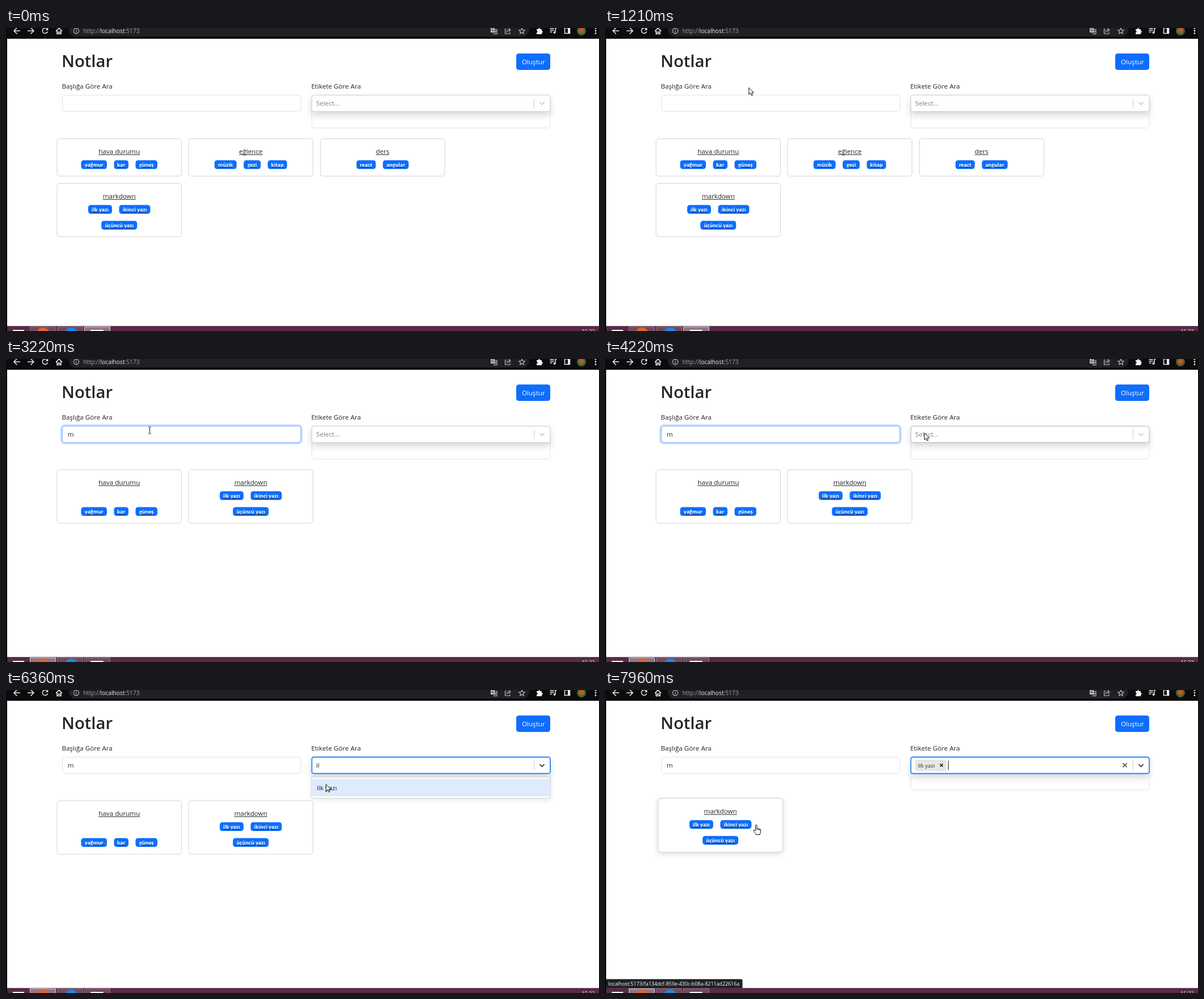
Animation of 1046 by 535 pixels, one loop 8 s. Source, as an HTML page:

```html
<!DOCTYPE html>
<html lang="tr">
<head>
<meta charset="utf-8">
<title>Notlar</title>
<style>
  html, body { margin: 0; width: 100%; height: 100%; overflow: hidden; background: #fff; }
  svg { display: block; }
  #stage { position: absolute; left: 0; top: 0; }
  text { font: 11.65px "Open Sans", "Noto Sans", sans-serif; fill: #212529; white-space: pre; }
  .mid { text-anchor: middle; }
  .h1 { font-size: 29.3px; font-weight: 600; }
  .badge { font-size: 8.65px; font-weight: 700; fill: #fff; }
  .tag { font-size: 9.8px; fill: #333; }
  .url { font-size: 10.25px; fill: #9aa0a6; }
  .status { font-size: 8.9px; fill: #fff; }
  .clock { font-size: 9px; fill: #fff; }
  .hint { fill: #808080; }
  .line { fill: none; stroke: #e8eaed; stroke-width: 1.5; }
  .thin { fill: none; stroke: #c4c7cb; stroke-width: 1.1; }
</style>
</head>
<body>
<svg id="stage" width="1046" height="535" viewBox="0 0 1046 535"></svg>
<script>
const LOOP = 8000;
const BLUE = '#0d6efd', FOCUS = '#2684ff', INK = '#212529';
const stage = document.getElementById('stage');

function el(tag, attrs, parent = stage) {
  const node = document.createElementNS('http://www.w3.org/2000/svg', tag);
  for (const k in attrs) node.setAttribute(k, attrs[k]);
  return parent.appendChild(node);
}
const group = (parent) => el('g', {}, parent);
const box = (x, y, width, height, fill, parent, more) =>
  el('rect', { x, y, width, height, fill, ...more }, parent);
const path = (d, attrs, parent) => el('path', { d, ...attrs }, parent);
function text(str, x, y, cls = '', parent) {
  const node = el('text', { x, y, class: cls }, parent);
  node.textContent = str;
  return node;
}
const show = (node, on) => { node.style.display = on ? '' : 'none'; };
const clamp = (v) => Math.max(0, Math.min(1, v));
const smooth = (v) => { v = clamp(v); return v * v * (3 - 2 * v); };
const between = (t, a, b) => t >= a && t < b;

// Page
box(0, 0, 1046, 535, '#fff');
text('Notlar', 98, 69, 'h1');
box(900, 45, 60, 29, BLUE, stage, { rx: 4.6 });
text('Oluştur', 930.3, 64, 'mid').style.fill = '#fff';
text('Başlığa Göre Ara', 98.5, 107);
text('Etikete Göre Ara', 538.5, 107);

// Note cards
const WIDTHS = {
  'yağmur': 45.5, 'kar': 25.5, 'güneş': 38.5, 'müzik': 39, 'gezi': 30, 'kitap': 34,
  'react': 34, 'angular': 45.5, 'ilk yazı': 42, 'ikinci yazı': 55, 'üçüncü yazı': 63
};
const WEATHER = ['yağmur', 'kar', 'güneş'];
const WRITING = [['ilk yazı', 'ikinci yazı'], ['üçüncü yazı']];

function underline(label, cx, y, thick, parent) {
  const w = label.getComputedTextLength();
  box(cx - w / 2, y, w, thick, INK, parent);
}

function card(parent, x, y, h, title, rows, firstRow = 38) {
  const g = group(parent), cx = x + 109.75;
  box(x, y, 219.5, h, '#fff', g, { rx: 4.6, stroke: '#d3d3d3' });
  underline(text(title, cx, y + 26.5, 'mid', g), cx, y + 27.7, 1, g);
  rows.forEach((row, i) => {
    const gap = 12.5, top = y + firstRow + i * 28;
    let bx = cx - (row.reduce((s, n) => s + WIDTHS[n], 0) + gap * (row.length - 1)) / 2;
    for (const name of row) {
      const w = WIDTHS[name], mid = bx + w / 2;
      box(bx, top, w, 15.5, BLUE, g, { rx: 4.6 });
      underline(text(name, mid, top + 11, 'mid badge', g), mid, top + 12, 0.9, g);
      bx += w + gap;
    }
  });
  return g;
}

const allNotes = group(), foundNotes = group(), oneNote = group();
card(allNotes, 90, 195.5, 66, 'hava durumu', [WEATHER]);
card(allNotes, 322, 195.5, 66, 'eğlence', [['müzik', 'gezi', 'kitap']]);
const lesson = card(allNotes, 554.5, 195.5, 66, 'ders', [['react', 'angular']]);
card(allNotes, 90, 274.5, 94, 'markdown', WRITING);
card(foundNotes, 90, 195.5, 94.5, 'hava durumu', [WEATHER], 66);
card(foundNotes, 322, 195.5, 94.5, 'markdown', WRITING);
const markdown = card(oneNote, 90, 195.5, 94.5, 'markdown', WRITING);

// Title field
const ring = box(97.5, 117, 424, 32, 'none', stage, { rx: 6, stroke: '#c2dbfe', 'stroke-width': 3 });
box(99.5, 118.5, 420.5, 28.8, '#fff', stage, { rx: 4.6, stroke: '#dee2e6' });
const ringEdge = box(99.5, 118.5, 420.5, 28.8, 'none', stage, { rx: 4.6, stroke: '#86b7fe' });
const typedM = text('m', 108.7, 137);

// Tag field
box(539.5, 140, 420.5, 36.7, '#fff', stage, { rx: 4.6, stroke: '#dee2e6' });
const control = box(539.5, 118.5, 420.5, 29, '#fff', stage, { rx: 3.5 });
control.style.filter = 'drop-shadow(0 6px 6px rgba(0,0,0,.15))';
const hint = text('Select...', 547, 137, 'hint');
const typedTag = text('', 547, 137);
box(931, 125, 1, 16, '#ccc');
const chevron = path('M941.4 131.2l4.1 4 4.1-4', { fill: 'none', 'stroke-width': 1.8 });
const picked = group();
box(547, 123, 55, 20, '#e6e6e6', picked, { rx: 1.6 });
text('ilk yazı', 552, 137, 'tag', picked);
path('M591 130.4l5 5m0-5l-5 5', { stroke: '#222', 'stroke-width': 1.5 }, picked);
path('M913.4 129.2l7.2 7.2m0-7.2l-7.2 7.2', { stroke: '#666', 'stroke-width': 2 }, picked);

// Drop-down lists
const ROW = 30.8;
function menu(items, height, thumb) {
  const g = group();
  box(539, 154, 421, height, '#fff', g, { rx: 3, stroke: 'rgba(0,0,0,.14)' })
    .style.filter = 'drop-shadow(0 3px 4px rgba(0,0,0,.1))';
  const list = el('svg', { x: 539, y: 154, width: 421, height }, g);
  const active = box(0, 3, thumb ? 408 : 421, ROW, '#deebff', list);
  items.forEach((name, i) => text(name, 9, 23 + i * ROW, '', list));
  if (thumb) {
    box(408, 0, 13, height, '#f1f1f1', list);
    box(409.5, 12.5, 10.5, thumb, '#c1c1c1', list);
    path('M411.5 8.2l3.2-3.4 3.2 3.4z', { fill: '#a3a3a3' }, list);
    path('M411.5 222.5l3.2 3.4 3.2-3.4z', { fill: '#505050' }, list);
  }
  return { g, active };
}
const tail = ['başlık', 'alt başlık', 'ilk yazı', 'ikinci yazı', 'üçüncü yazı'];
const menuAll = menu([...WEATHER, 'müzik', 'gezi', 'kitap', 'react', 'angular', ...tail], 231.5, 117);
const menuI = menu(['müzik', 'gezi', 'kitap', ...tail], 231.5, 188);
const menuIl = menu(['ilk yazı'], 37, 0);

const caret = box(0, 125, 1, 16, INK);

// Browser bar
box(0, 0, 1046, 19, '#0c0a0c');
box(0, 19, 2, 516, '#000');
box(111, -10, 812, 25, '#202124', stage, { rx: 12 });
path('M25 5H14.5M19.5-.5L14 5l5.500 5.500M38 5H48.500M43.500-.5L49 5l-5.500 5.500', { class: 'line' });
path('M72.600 1.600A4.700 4.700 0 1 0 73.500 6.200', { class: 'line' });
path('M74.300-.5V4h-4.500z', { fill: '#e8eaed' });
path('M88 5.500L93.500 0 99 5.500M90 4V10.500H92.300V7H94.700V10.500H97V4', { class: 'line' });
el('circle', { cx: 124, cy: 5, r: 4.6, class: 'thin' });
path('M124 4.500V7.500M124 2.300V3.500', { class: 'thin' });
const url = text('http://', 136.5, 8.7, 'url');
[['localhost', '#e8eaed'], [':5173', '#9aa0a6']].forEach(([s, fill]) => {
  el('tspan', { fill }, url).textContent = s;
});
box(855, -1, 7, 9, '#c4c7cb', stage, { rx: 1 });
path('M860 2.500H866V10.500H859.500M861 5.500h4M863 4.500v1m1.500 0q-.7 2.500-3 3.500', { class: 'thin' });
path('M860.300 2a2 2 0 1 0 .2 2.500H858.700', { fill: 'none', stroke: '#202124' });
path('M883 2H880.500V10H889V7.500M883 7.500Q883.500 3.500 888 3.500M886.500.5L890 3.500 886.500 6.500', { class: 'thin' });
path('M910 .2l1.500 3.300 3.600.4-2.700 2.400.8 3.600-3.200-1.900-3.200 1.900.8-3.600-2.700-2.400 3.600-.4z', { class: 'thin' });
path('M936 2h2.700a1.800 1.800 0 0 1 3.600 0H945v3a1.800 1.800 0 0 1 0 3.600V11H936V8a1.700 1.700 0 0 0 0-3.400z', { fill: '#f1f3f4' });
path('M959.500 1h7M959.500 4h7M959.500 7h4M969 8V.500h2.500', { class: 'line' });
el('circle', { cx: 967.5, cy: 8, r: 1.9, fill: '#e8eaed' });
path('M985.500 0H994.500V9.500H985.500z', { class: 'line' });
box(991, 0, 4, 9.5, '#e8eaed');
el('circle', { cx: 1015, cy: 5, r: 8, fill: '#3d6b35' });
el('circle', { cx: 1015, cy: 4.5, r: 4.8, fill: '#bd5a2c' });
[0.5, 5, 9.5].forEach((cy) => el('circle', { cx: 1040, cy, r: 1.4, fill: '#e8eaed' }));

// Taskbar
box(2, 526.5, 1044, 9, '#5b2a48');
box(2, 526.5, 1044, 1, '#47203a');
box(12, 533, 20, 4, '#fff');
const [taskA, , taskC] = [42.5, 90.5, 138.5].map((x) =>
  box(x, 527.5, 45, 12, '#75495f', stage, { stroke: '#927083' }));
el('circle', { cx: 65, cy: 541, r: 12, fill: '#e0662c' });
el('circle', { cx: 115, cy: 541, r: 12, fill: '#1e88e5' });
box(149, 533, 23, 6, '#fff', stage, { rx: 1.5 });
text('15:22', 1015.5, 539, 'clock');

// Link address bubbles
function bubble(address, w) {
  const g = group();
  path(`M2 510.500H${w - 1}q3 0 3 3V526.500H2z`, { fill: '#202124' }, g);
  text(address, 5.7, 522, 'status', g);
  return g;
}
const bubbleA = bubble('localhost:5173/f34a059d-1203-4925-86da-393ee9d5c805', 243.5);
const bubbleB = bubble('localhost:5173/fa134dcf-859e-430c-b08a-8211ad22616a', 240.5);

// Pointer
const pointer = group();
const solid = { fill: '#fff', stroke: '#000', 'stroke-width': 0.95, 'stroke-linejoin': 'round' };
const shapes = {
  arrow: path('M0 0V12L2.800 9.400 4.700 13.700 6.700 12.800 4.900 8.700H8.600z', solid, pointer),
  beam: path('M-2.500-6H-.6M.6-6H2.500M0-5.500V5.500M-2.500 6H-.6M.6 6H2.500',
    { fill: 'none', stroke: '#222', 'stroke-width': 1.1 }, pointer),
  hand: path('M-.2 1.300C-.2-.4 2.400-.4 2.400 1.300V6.300C3.400 5.600 4.800 5.900 5 7 6 6.500 7.100 6.900 7.300 7.800' +
    'C8.300 7.400 9 8 9 9V12.500C9 14.500 7.600 15.500 7.600 17.500H.9C.5 15.500-1.800 13.400-3.200 11.200' +
    'C-4.200 9.600-2.400 8.600-1.200 9.800L-.2 10.900zM2.400 6.300V9.500M5 7V9.800M7.300 7.800V10', solid, pointer)
};

// time, x, y, shape until the next step
const track = [
  [0, 898, 300, ''], [270, 898, 300, 'arrow'], [470, 774, 262, 'hand'], [680, 554, 196, 'arrow'],
  [745, 380, 146, 'beam'], [760, 352, 139, 'beam'], [900, 300, 118, 'arrow'], [1060, 254, 97, 'arrow'],
  [1120, 254, 97, 'arrow'], [1270, 253.5, 118, 'beam'], [1400, 253.5, 126, 'beam'],
  [3220, 253.5, 126, 'beam'], [3330, 340, 148, 'arrow'], [3420, 430, 174, 'arrow'],
  [3540, 506, 153, 'arrow'], [3820, 506, 153, 'arrow'], [4190, 565, 130, 'arrow'],
  [6020, 565, 130, 'arrow'], [6360, 564.5, 169, 'arrow'], [6880, 564.5, 171, 'beam'],
  [7210, 564.5, 171, 'beam'], [7320, 535, 178, 'arrow'], [7740, 308, 236, 'hand'],
  [7940, 265.5, 238, 'hand'], [8000, 265.5, 238, 'hand']
];

function movePointer(t) {
  let i = track.findIndex((k) => k[0] > t) - 1;
  if (i < 0) i = track.length - 2;
  const [t0, x0, y0, kind] = track[i], [t1, x1, y1] = track[i + 1];
  const p = clamp((t - t0) / (t1 - t0));
  pointer.setAttribute('transform', `translate(${x0 + (x1 - x0) * p} ${y0 + (y1 - y0) * p})`);
  for (const k in shapes) show(shapes[k], k === kind);
}

function lift(node, v) {
  node.setAttribute('transform', `translate(${3.85 * v} ${-3.85 * v})`);
  node.style.filter = v > 0 ? `drop-shadow(0 2px 5px rgba(0,0,0,${0.16 * v}))` : '';
}

// start, end, x
const carets = [
  [1690, 2480, 109], [2480, 4610, 119], [4640, 5560, 547],
  [5560, 5840, 549.5], [5840, 6890, 553], [6890, 8001, 605]
];

function setTask(node, on) {
  node.setAttribute('fill', on ? '#937686' : '#75495f');
  node.setAttribute('stroke', on ? '#dccfd6' : '#927083');
}

function render(t) {
  const q = Math.max(0, Math.floor((t + 20) / 60) * 60 - 20);
  show(allNotes, t < 2480);
  show(foundNotes, between(t, 2480, 6890));
  show(oneNote, t >= 6890);
  lift(lesson, smooth((q - 470) / 200) * (1 - smooth((q - 680) / 200)));
  lift(markdown, smooth((q - 7740) / 200));
  bubbleA.style.opacity = clamp((q - 480) / 140) * (1 - clamp((q - 690) / 200));
  bubbleB.style.opacity = clamp((q - 7780) / 150);

  const glow = clamp((t - 1660) / 150) * (1 - clamp((t - 4610) / 150));
  ring.style.opacity = ringEdge.style.opacity = glow;
  show(typedM, t >= 2480);
  setTask(taskA, t >= 1680);
  setTask(taskC, t < 1680);

  const focus = t >= 4610;
  control.setAttribute('stroke', focus ? FOCUS : t >= 4080 ? '#b3b3b3' : '#ccc');
  control.setAttribute('stroke-width', focus ? 1.8 : 1);
  chevron.setAttribute('stroke', focus ? '#2c3a52' : '#ccc');
  show(hint, t < 5560);
  typedTag.textContent = between(t, 5560, 5840) ? 'i' : between(t, 5840, 6890) ? 'il' : '';
  show(picked, t >= 6890);
  show(menuAll.g, between(t, 4610, 5560));
  show(menuI.g, between(t, 5560, 5840));
  show(menuIl.g, between(t, 5840, 6890));
  menuIl.active.setAttribute('fill', between(t, 6620, 6700) ? '#b2d4ff' : '#deebff');

  const c = carets.find(([a, b]) => between(t, a, b));
  show(caret, c && Math.floor((t - c[0]) / 520) % 2 === 0);
  if (c) caret.setAttribute('x', c[2]);
  movePointer(t < 270 ? 0 : Math.max(q, 270));
}

const start = performance.now();
function tick() {
  render((performance.now() - start) % LOOP);
  requestAnimationFrame(tick);
}
tick();
</script>
</body>
</html>
```
